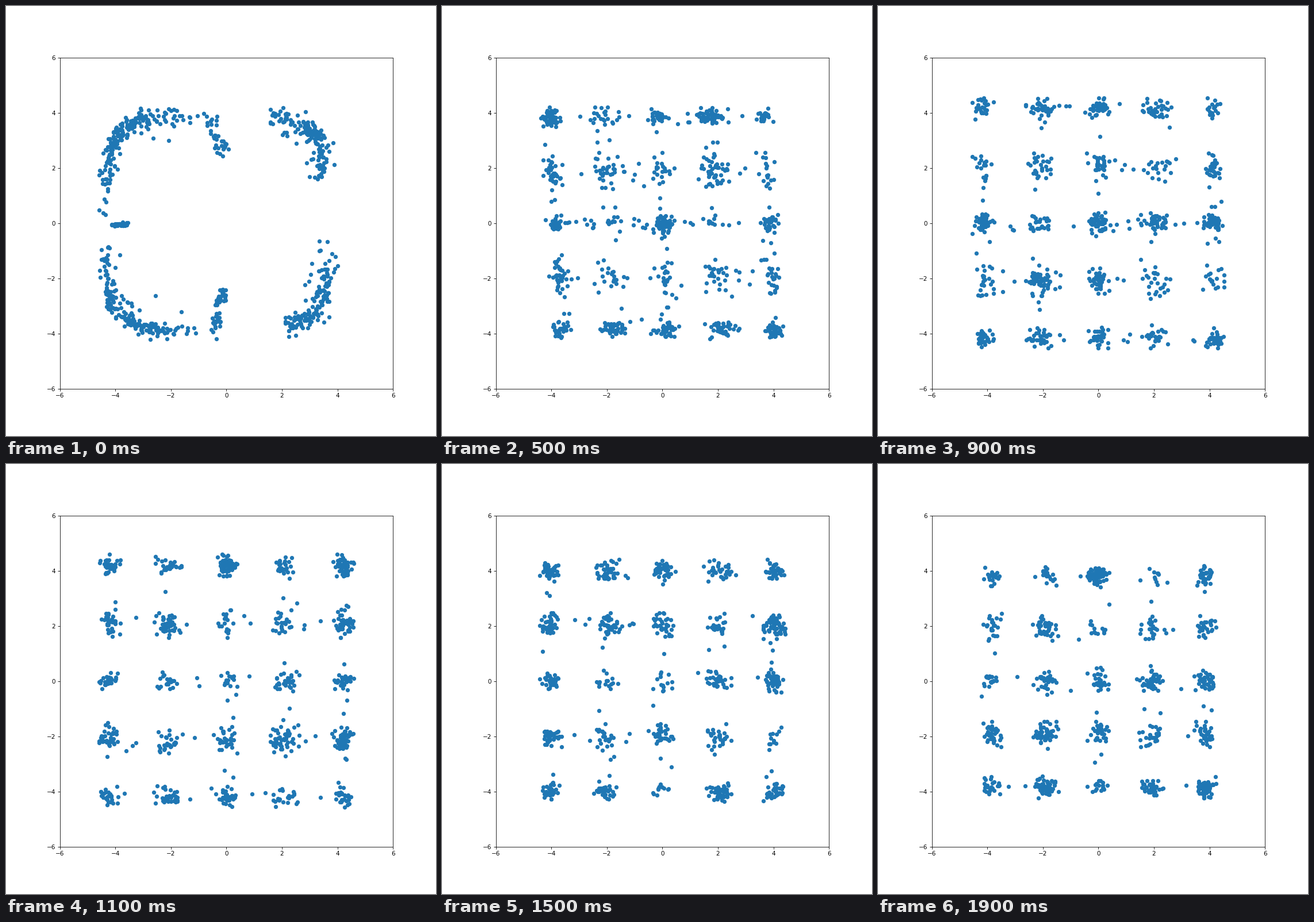
Recreate the animation shown at these times as a matplotlib script. Size 748 by 748 pixels, loop 2000 ms.

```python
import numpy as np
import matplotlib.pyplot as plt
from matplotlib.animation import FuncAnimation

STEPS = 20
INTERVAL = 100
WEB_STEP = 2
GRID_STEP = 5
GRID = np.arange(-4, 5, 2)


def jitter(rng, n, spread):
    return spread * rng.normal(size=(n, 2)).clip(-2.3, 2.3)


def strand(rng, start, end, n, spread):
    """Noisy points along a line, denser towards its ends."""
    t = rng.beta(.7, .7, (n, 1))
    return (1 - t) * start + t * np.array(end) + jitter(rng, n, spread)


def ring(rng, n=720):
    """A broken superellipse with two spurs turning inwards."""
    angle = rng.uniform(0, 2 * np.pi, n)
    unit = np.column_stack([np.cos(angle), np.sin(angle)])
    pts = np.sign(unit) * np.abs(unit) ** .44 * [4.05, 4.0]
    pts *= 1 - rng.exponential(.03, (n, 1))
    pts += [-.35, 0] + jitter(rng, n, .14)
    x, y = pts.T
    keep = (x < -.1) | ((x > 1.5) & (y > 1.6)) | ((x > 2.1) & (y < -.5))
    return np.vstack([
        pts[keep],
        strand(rng, (-.6, 3.7), (-.1, 2.5), 32, .13),
        strand(rng, (-.45, -3.85), (-.15, -2.4), 45, .1),
        strand(rng, (-4.1, -.07), (-3.6, -.04), 32, .04),
    ])


def web(rng):
    """A square frame with a middle bar and a loose filling."""
    left, right, low, high = -4.15, 4.3, -4.2, 4.15
    return np.vstack([
        strand(rng, (left, low), (left, high), 150, .22),
        strand(rng, (right, low), (right, high), 130, .19),
        strand(rng, (left, high), (right, high), 160, .24),
        strand(rng, (left, low), (right, low), 270, .26),
        strand(rng, (0, low), (0, high), 140, .12),
        strand(rng, (4, 0), (4.6, .1), 35, .12),
        rng.uniform([-3.7, -3.7], [3.9, 3.6], (150, 2)),
        rng.uniform([1.2, -4], [3.9, -1.1], (90, 2)),
    ])


def clusters(rng, step, n=860):
    """A 5 by 5 grid of blobs that tightens and loses its bridges."""
    p = max(step - GRID_STEP, 0) / (STEPS - 1 - GRID_STEP)
    ease = 1 - (1 - p) ** 2
    breath = .96 + .09 * np.sin(np.pi * min(p * 7 / 6, 1))
    squeeze = .6 + .35 * ease

    cell = rng.choice(25, n, p=rng.dirichlet(np.full(25, 8)))
    index = np.column_stack([cell % 5, cell // 5])
    noise = jitter(rng, n, .25 - .07 * ease)
    noise *= np.where(index % 2 == 0, squeeze, 1.1)

    # Some points stray along a grid line towards a neighbour
    stray = rng.random(n) < .27 - .18 * ease
    axis = rng.integers(0, 2, n)
    noise[np.arange(n), axis] += stray * rng.uniform(-1, 1, n)

    pts = GRID[index] * breath + noise
    limit = 4 * breath + .4
    over = np.abs(pts) > limit
    pts = np.where(over, np.sign(pts) * 2 * limit - pts, pts)
    pts[:, 0] -= .05 * max(1 - 7 * p, 0) * pts[:, 1]
    return pts


def mix(rng, a, b, t):
    return np.vstack([a[rng.random(len(a)) >= t], b[rng.random(len(b)) < t]])


def samples(step):
    rng = np.random.default_rng(40 + step)
    if step < WEB_STEP:
        return mix(rng, ring(rng), web(rng), step / WEB_STEP)
    if step < GRID_STEP:
        t = (step - WEB_STEP) / (GRID_STEP - WEB_STEP)
        return mix(rng, web(rng), clusters(rng, step), t)
    return clusters(rng, step)


fig, ax = plt.subplots(figsize=(10, 10), dpi=74.8)
ax.set(xlim=(-6, 6), ylim=(-6, 6))
dots = ax.scatter([], [], color="#1f77b4")


def draw(step):
    dots.set_offsets(samples(step))
    return dots,


def reset():
    return draw(0)


anim = FuncAnimation(fig, draw, frames=STEPS, init_func=reset,
                     interval=INTERVAL, repeat=True, repeat_delay=0)
plt.show()
```
